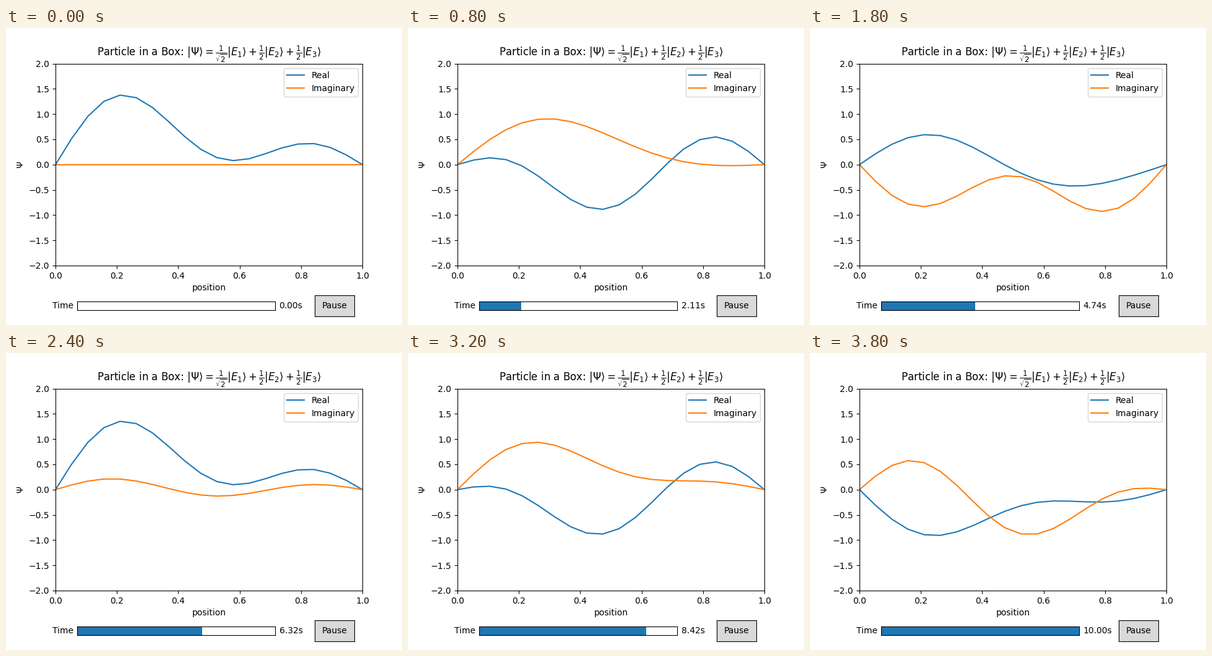
Recreate the animation shown at these times as a matplotlib script. Size 640x480 px, loop 4000 ms.

```python
import numpy as np
import matplotlib.pyplot as plt
from matplotlib.animation import FuncAnimation

FRAMES, INTERVAL = 20, 200
T_MAX = 10

x = np.linspace(0, 1, 20)
times = np.linspace(0, T_MAX, FRAMES)
LEVELS = ((1, 1 / np.sqrt(2)), (2, 0.5), (3, 0.5))


def psi(t):
    """Superposed box eigenstates; each phase turns with n squared."""
    return sum(c * np.sin(n * np.pi * x) * np.exp(1j * n**2 * t)
               for n, c in LEVELS)


def control_axes(rect, color="white"):
    ax = fig.add_axes(rect, facecolor=color)
    ax.set(xticks=[], yticks=[])
    return ax


fig, ax = plt.subplots(figsize=(6.4, 4.8), dpi=100)
fig.subplots_adjust(left=0.125, right=0.9, bottom=0.2, top=0.88)
ax.set(xlim=(0, 1), ylim=(-2, 2), xlabel="position", ylabel=r"$\Psi$")
ax.set_title(r"Particle in a Box: $|\Psi\rangle = \frac{1}{\sqrt{2}}"
             r"|E_1\rangle + \frac{1}{2}|E_2\rangle + \frac{1}{2}|E_3\rangle$")
real, = ax.plot(x, psi(0).real, label="Real")
imag, = ax.plot(x, psi(0).imag, label="Imaginary")
ax.legend(loc="upper right")

# Time slider
slider = control_axes([0.18, 0.05, 0.5, 0.03])
slider.set(xlim=(0, T_MAX), ylim=(0, 1))
bar = plt.Rectangle((0, 0), 0, 1, facecolor="C0", edgecolor="none")
slider.add_patch(bar)
slider.axvline(0, color="r", lw=1)
slider.text(-0.02, 0.5, "Time", transform=slider.transAxes,
            va="center", ha="right")
clock = slider.text(1.02, 0.5, "", transform=slider.transAxes,
                    va="center", ha="left")

# Pause button
button = control_axes([0.78, 0.03, 0.1, 0.07], "0.85")
button.text(0.5, 0.5, "Pause", transform=button.transAxes,
            va="center", ha="center")


def update(i):
    t = times[i]
    wave = psi(t)
    real.set_ydata(wave.real)
    imag.set_ydata(wave.imag)
    bar.set_width(t)
    clock.set_text(f"{t:.2f}s")
    return real, imag, bar, clock


anim = FuncAnimation(fig, update, frames=FRAMES, interval=INTERVAL,
                     repeat=True, repeat_delay=0)
plt.show()
```
